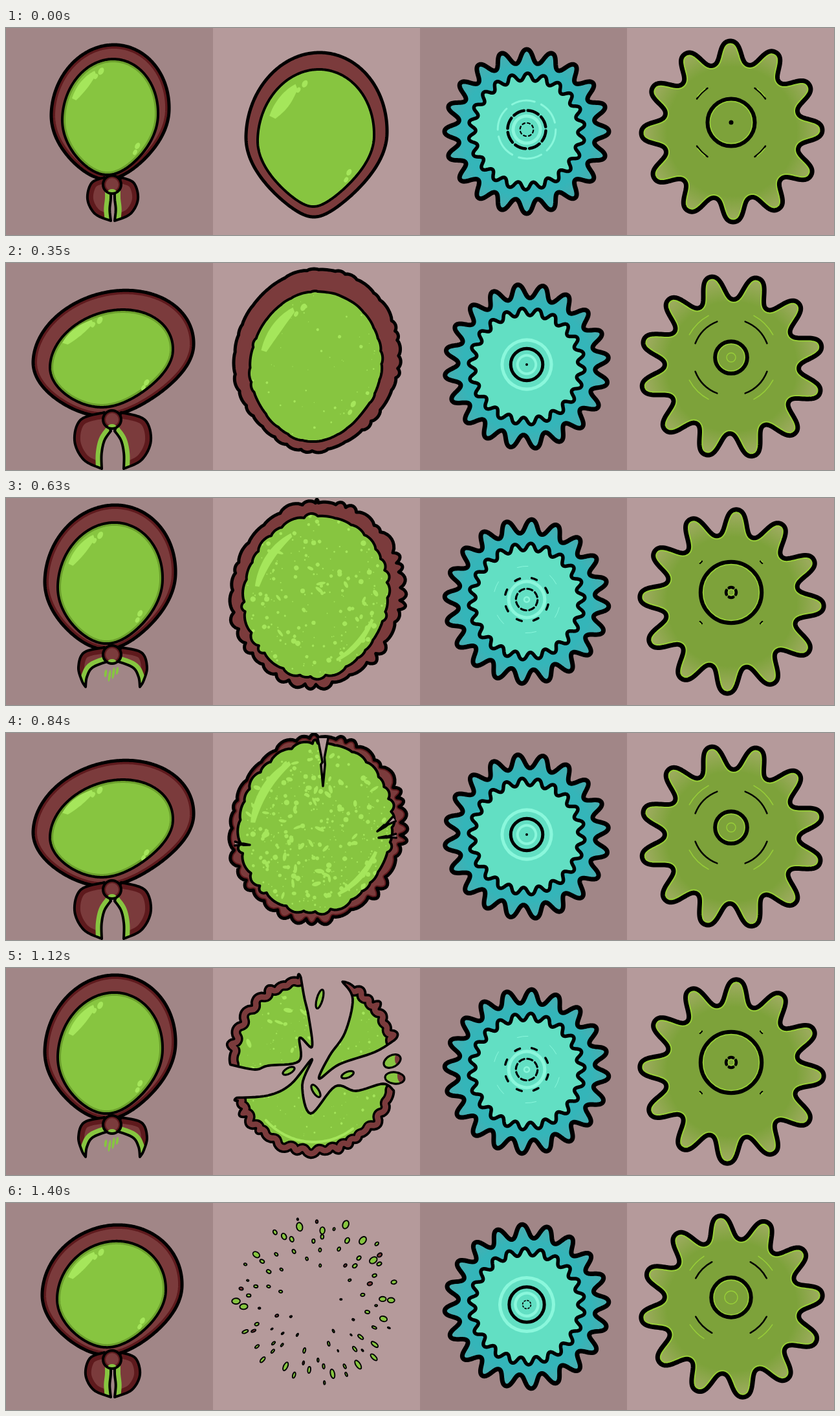
Recreate the animation shown at these times as an HTML page with a canvas. Size 1280x320 px, loop 1470 ms.

```html
<!DOCTYPE html>
<html lang="en">
<head>
<meta charset="utf-8">
<title>Slime shapes</title>
<style>
  html, body { margin: 0; width: 100%; height: 100%; overflow: hidden; background: #a18687; }
  canvas { display: block; width: 1280px; height: 320px; }
</style>
</head>
<body>
<canvas id="stage" width="1280" height="320"></canvas>
<script>
const ctx = document.getElementById('stage').getContext('2d');
const STEP = 70, COUNT = 21, CYCLE = 7, TAU = Math.PI * 2, DEG = TAU / 360;
const DARK = '#a18687', PALE = '#b59a9b', INK = '#000', SKIN = '#7b3b3c', SHADE = '#5e1a1d',
  SLIME = '#87c540', SHINE = '#a5e65b', MOSS = '#6b9f2c', LIME = '#98cf38', MINT = '#8af7dc';

// ---- geometry ----
const rng = seed => () => (seed = (seed * 16807) % 2147483647) / 2147483647;
const mix = (a, b, k) => a + (b - a) * k;

// Points of an egg, clockwise from the top; taper narrows the lower half.
function egg({ cx, top, bottom, rx, taper = 0, lean = 0, tilt = 0 }, from = 0, to = 360) {
  const cy = (top + bottom) / 2, ry = (bottom - top) / 2, pts = [];
  for (let d = from; d <= to; d++) {
    const s = Math.sin(d * DEG), c = Math.cos(d * DEG), low = Math.min(0, c);
    pts.push([cx + rx * s * (1 - taper * low * low) + lean * c, cy - ry * c - tilt * s]);
  }
  return pts;
}

function spline(pts, n = 8) {
  const out = [], get = i => pts[Math.max(0, Math.min(pts.length - 1, i))];
  for (let i = 0; i < pts.length - 1; i++) {
    const [a, b, c, d] = [get(i - 1), get(i), get(i + 1), get(i + 2)];
    for (let s = 0; s < n; s++) {
      const t = s / n;
      out.push([0, 1].map(q => b[q] + t / 2 * (c[q] - a[q] + t * (2 * a[q] - 5 * b[q] + 4 * c[q] - d[q]
        + t * (3 * (b[q] - c[q]) + d[q] - a[q])))));
    }
  }
  out.push(pts[pts.length - 1]);
  return out;
}

// Replaces a line with a row of uneven outward bumps.
function scallop(line, step, height, seed) {
  const rand = rng(seed), out = [];
  let a = line[0], need = step;
  line.forEach((p, i) => {
    const dx = p[0] - a[0], dy = p[1] - a[1], d = Math.hypot(dx, dy);
    if (!d || (d < need && i < line.length - 1)) return;
    const h = height * (.3 + rand());
    for (let s = 0; s < 8; s++) {
      const t = s / 8, b = h * Math.sin(Math.PI * t) ** .7;
      out.push([a[0] + dx * t + dy / d * b, a[1] + dy * t - dx / d * b]);
    }
    a = p;
    need = step * (.5 + rand());
  });
  out.push(a);
  return out;
}

function trace(pts, closed) {
  const path = new Path2D();
  pts.forEach(p => path.lineTo(p[0], p[1]));
  if (closed) path.closePath();
  return path;
}

// ---- painting ----
function fill(path, color) { ctx.fillStyle = color; ctx.fill(path); }
function line(path, color, width) { ctx.strokeStyle = color; ctx.lineWidth = width; ctx.stroke(path); }
function inside(path, draw) { ctx.save(); ctx.clip(path); draw(); ctx.restore(); }
function oval(x, y, rx, ry, turn = 0) {
  const p = new Path2D();
  p.ellipse(x, y, rx, ry, turn, 0, TAU);
  return p;
}
// Ring split into n equal dashes; part is the drawn share of each.
function ring(x, y, r, n, part, color, width, from = 0) {
  const p = new Path2D(), half = Math.PI / n * part;
  for (let i = 0; i < n; i++) {
    const mid = from + TAU / n * i;
    p.moveTo(x + r * Math.cos(mid - half), y + r * Math.sin(mid - half));
    p.arc(x, y, r, mid - half, mid + half);
  }
  line(p, color, width);
}

// Curved highlight at the upper left of an egg and four spots.
function gloss({ cx, top, bottom, rx }, from, to, thick, spots) {
  const cy = (top + bottom) / 2, ry = (bottom - top) / 2, edge = [[], []];
  for (let t = 0; t <= 1.001; t += .05) {
    const a = mix(from, to, t) * DEG, w = thick * Math.sin(Math.PI * (.12 + .8 * t)) ** .6;
    [.86, .86 - w].forEach((r, i) => edge[i].push([cx + rx * r * Math.sin(a), cy - ry * r * Math.cos(a)]));
  }
  fill(trace(edge[0].concat(edge[1].reverse()), true), SHINE);
  if (!spots) return;
  [[-.3, -.7, 3], [-.19, -.79, 4], [.57, .5, 3.6], [.52, .61, 3]].forEach(([u, v, r]) =>
    fill(oval(cx + rx * u, cy + ry * v, r, r * 1.5, .5), SHINE));
}

// ---- tied balloon ----
// Sack and belly as centre, top, bottom, half width; then tilt; flap width, spread and tip.
const POSES = [
  [0, 161, 26, 234, 91, 161, 48, 227, 74, 2, 39, 3, 298],
  [2, 161, 11, 234, 101, 161, 38, 225, 81, 4, 53, 42, 292],
  [5, 166, 43, 236, 124, 163, 73, 222, 95, 12, 59, 17, 318],
  [6, 164, 34, 235, 108, 163, 59, 223, 84, 5, 42, 3, 300]];

function poseAt(beat) {
  const i = Math.max(1, POSES.findIndex(p => p[0] >= beat)), a = POSES[i - 1], b = POSES[i];
  return a.map((v, j) => mix(v, b[j], (beat - a[0]) / (b[0] - a[0])));
}

function flap(side, wide, spread, tip) {
  const y = 231, h = tip - y, at = ([u, v]) => [165 + side * u, y + h * v];
  const rim = spline([[13, 0], [wide * .84, .13], [wide, .5], [wide * .68 + spread * .28, .84], [spread, 1]].map(at));
  const edge = spline([[spread, 1], [spread * .9 + 2, .74], [spread * .7 + 1, .5], [3, .33]].map(at));
  const path = trace(rim.concat(edge), true);
  fill(path, SKIN);
  inside(path, () => {
    line(trace(rim), SHADE, 18);
    line(trace(edge), SLIME, 18);
  });
  line(path, INK, 4);
}

function tied(beat) {
  const [, cx, top, bottom, rx, bx, btop, bbottom, brx, tilt, wide, spread, tip] = poseAt(beat);
  const core = { cx: bx, top: btop, bottom: bbottom, rx: brx, taper: .2, lean: 3, tilt };
  const sack = trace(egg({ cx, top, bottom, rx, taper: .25, lean: 4, tilt }), true), belly = trace(egg(core), true);
  fill(sack, SKIN);
  inside(sack, () => line(sack, SHADE, 12));
  fill(belly, SLIME);
  inside(belly, () => line(belly, MOSS, 10));
  gloss(core, -68, -22, .17, true);
  line(belly, INK, 4);
  line(sack, INK, 5);
  if (beat > 0 && beat < 4) {
    for (let i = 0; i < 4; i++) fill(oval(154 + i * 6, 257 + beat * 7 + 4 * Math.sin(i * 1.6), 2, 6 + 3 * (i % 3 > 0), .15), SLIME);
  }
  flap(-1, wide, spread, tip);
  flap(1, wide, spread, tip);
  const knot = oval(164, 242, 14, 14);
  fill(knot, SKIN);
  inside(knot, () => {
    line(knot, SHADE, 8);
    fill(oval(164, 254, 7, 5), SLIME);
  });
  line(knot, INK, 4);
}

// ---- bursting balloon ----
function specks(n, size, blobs) {
  const rand = rng(77);
  for (let i = 0; i < n + blobs; i++) {
    const a = rand() * TAU, d = Math.sqrt(rand()), r = size * (.5 + 2 * rand() ** 3);
    const long = i < n ? r : 3 + 5 * rand(), thin = i < n ? r : 2 + 1.5 * rand();
    fill(oval(480 + 110 * d * Math.cos(a), 150 + 123 * d * Math.sin(a), long, thin, rand() * 3), SHINE);
  }
}

function crack(x, y, dx, dy, wide) {
  const d = Math.hypot(dx, dy), nx = -dy / d * wide, ny = dx / d * wide;
  const at = (t, o) => [x + dx * t + nx * o, y + dy * t + ny * o];
  const path = trace([at(0, 1), at(.5, .1), at(.55, .4), at(1, 0), at(.55, -.4), at(.4, -.3), at(0, -1)]);
  fill(path, PALE);
  line(path, INK, 3.5);
}

function whole(age) {
  const rough = Math.max(0, Math.min(1, (age - 2) / 8)), taper = .4 * Math.exp(-age / 5);
  const hullEgg = { cx: 480, top: 7 + 31 * Math.exp(-age / 2.2), bottom: 292 - 4 * rough,
    rx: 131 - 22 * Math.exp(-age / 3), taper, lean: 3, tilt: 2 };
  const coreEgg = { cx: 479, top: 64 - 4 * age, bottom: 276, rx: 90 + 2.3 * age, taper, lean: 3, tilt: 2 };
  const shape = (e, height, seed) => trace(rough ? scallop(egg(e), 25, height * rough, seed) : egg(e), true);
  const hull = shape(hullEgg, 9, 31), core = shape(coreEgg, 5, 12);
  fill(hull, SKIN);
  if (age > 9) inside(hull, () => line(hull, SHADE, 9));
  fill(core, SLIME);
  inside(core, () => {
    if (age > 3) specks((age - 3) * 30, Math.min(1.7, .5 + age * .14), Math.max(0, age - 8) * 15);
    gloss(coreEgg, -68 - age * 1.5, -24, Math.max(.11, .2 - age * .01), age < 9);
    if (age > 8) gloss(coreEgg, 110, 160, .07, false);
  });
  line(core, INK, 4);
  line(hull, INK, 5);
  const open = Math.min(1.3, (age - 10) / 2);
  if (open > 0) {
    crack(490, 8, 0, 74 * open, 8);
    crack(603, 159, -27 * open, 3, 3);
    crack(600, 133, -26 * open, 19, 4);
    crack(354, 171, 23 * open, 2, 3);
  }
}

// Rim angles, drift direction and the torn edge back to the rim's start.
const PIECES = [
  { from: -90, to: -9, way: [-10, -7], edge: [[461, 45], [468, 76], [473, 122], [454, 108], [453, 144], [405, 151], [385, 157]] },
  { from: 20, to: 74, way: [11, -6], edge: [[570, 130], [515, 149], [484, 171], [500, 136], [524, 100], [536, 48]] },
  { from: 107, to: 248, way: [0, 9], edge: [[405, 197], [440, 180], [473, 141], [458, 181], [471, 225], [509, 183], [541, 190], [583, 179]] }];
// x, y, half length, turn
const CHIPS = [[485, 48, 15, 1.85], [437, 159, 10, -.5], [479, 190, 11, 1], [528, 165, 10, -.4], [597, 144, 14, -.5], [601, 170, 15, .1]];

function broken(age) {
  const back = (age - 16) * .55;
  PIECES.forEach(({ from, to, way, edge }, i) => {
    const rim = scallop(egg({ cx: 476, top: 13, bottom: 286, rx: 129 }, from, to), 20, 7, 41 + i);
    const torn = spline([rim[rim.length - 1], ...edge, rim[0]]);
    const path = trace(rim.concat(torn), true), band = trace(rim);
    ctx.save();
    ctx.translate(way[0] * back, way[1] * back);
    fill(path, SLIME);
    inside(path, () => {
      specks(150, .9, i ? 0 : 50);
      if (i > 1) line(trace(egg({ cx: 476, top: 40, bottom: 269, rx: 105 }, 145, 225)), SHINE, 4);
      line(band, INK, 28);
      line(band, SKIN, 21);
    });
    line(path, INK, 3.8);
    ctx.restore();
  });
  CHIPS.forEach(([x, y, len, turn]) => {
    const chip = oval(x, y, len, len > 13 && x > 590 ? 9 : 4.5, turn);
    fill(chip, SLIME);
    if (x > 590) inside(chip, () => fill(oval(x + 11, y - 3, 7, 11), SKIN));
    line(chip, INK, 3.2);
  });
}

function crumbs(age) {
  const left = 20 - age, rand = rng(23);
  for (let i = 0; i < 88; i++) {
    const a = i * 2.4 + rand() * .3, d = .3 + .7 * Math.sqrt(i / 88);
    const x = 480 + (126 - left * 2) * d * Math.cos(a), y = 149 + (130 - left * 2) * d * Math.sin(a);
    const len = (1.6 + 7 * d * d * rand()) * (1 + left * .5);
    const path = oval(x, y, len, len * (y > 190 ? .45 : .7), a);
    fill(path, rand() < .15 ? SKIN : SLIME);
    line(path, INK, 1.9);
  }
}

function burst(age) {
  if (age < 14) whole(age);
  else if (age < 17) broken(age);
  else crumbs(age);
}

// ---- gears ----
// Round-shouldered teeth: a cosine flattened at its ends.
function gear(x, y, n, tip, depth, turn, flat) {
  const pts = [];
  for (let i = 0; i < 720; i++) {
    const a = i / 720 * TAU, b = a + turn * DEG;
    const r = tip - depth + depth * Math.tanh(flat * Math.cos(n * a)) / Math.tanh(flat);
    pts.push([x + r * Math.sin(b), y - r * Math.cos(b)]);
  }
  return trace(pts, true);
}
function glow(x, y, base, rim) {
  const g = ctx.createRadialGradient(x, y, 100, x, y, 140);
  g.addColorStop(0, base);
  g.addColorStop(.85, rim);
  return g;
}
// Calls draw for every ring alive at this beat, one born each cycle.
function ripples(first, life, draw) {
  for (let age = first % CYCLE; age < life; age += CYCLE) draw(age);
}

function tealGear(beat) {
  const x = 805, y = 157, turn = (beat / CYCLE) ** 1.3 * 18;
  const outer = gear(x, 160, 20, 127, 10.5, turn, .8), inner = gear(x, 160, 22, 90, 5.5, turn * 20 / 22 + 1, .8);
  fill(outer, glow(x, 160, '#34b5b9', '#50aaad'));
  line(outer, INK, 7);
  fill(inner, '#62dfc3');
  line(inner, INK, 5.5);
  ripples(beat + 5, 15, age => {
    const r = 4 + 3.4 * age, fade = Math.max(0, age - 11);
    ring(x, y, r, fade ? 6 : 1, fade ? 1 - fade * .23 : 1, MINT, fade ? 4 - fade : Math.min(5, 2.5 + age / 2), .4);
  });
  ripples(beat + 2, 12, age => {
    const r = Math.max(2, 34 * (age / 11) ** .7);
    if (!age) fill(oval(x, y, r, r), INK);
    else if (age < 7) ring(x, y, r, 8, .35 + age * .07, INK, 1.2 + age * .5, .3);
    else if (age < 9) ring(x, y, r, 1, 1, INK, 5);
    else ring(x, y, r, 8, .75 - (age - 9) * .22, INK, 4.5 - (age - 9) * .5, .35);
  });
}

function leafGear(beat) {
  const x = 1121, y = 146, p = beat / CYCLE, swell = Math.sin(Math.PI * p), corner = Math.PI / 4;
  const body = gear(1122, 160, 12, 140 + 3 * swell, 17 + 3 * swell, 30 * p ** 1.6 - 1, 1.1);
  fill(body, glow(1122, 160, '#7da23a', '#9bab5c'));
  inside(body, () => line(body, LIME, 11));
  line(body, INK, 7);
  ripples(beat, 17, age => {
    const r = Math.max(3.5, 66 * Math.sin(age / 16 * Math.PI / 2) ** 1.3);
    if (!age) fill(oval(x, y, r, r), INK);
    else if (age < 10) {
      ring(x, y, r - 3.5, 1, 1, LIME, age < 3 ? 1.5 : 2.5);
      ring(x, y, r, age < 3 ? 4 : 1, age < 3 ? .55 : 1, INK, age < 3 ? 4.5 : 6);
    } else {
      const part = .9 * (1 - (age - 10) / 7) ** 1.6;
      ring(x, y, r, 4, part, INK, age < 12 ? 4 : 2.5, corner);
      ring(x, y, r + (age < 14 ? 14 : 1.5), 4, part * .7, LIME, 1.5, corner);
    }
  });
  if (beat > 3) ring(x, y, beat * 3 - 8, 1, 1, LIME, 1.4);
}

// ---- loop ----
ctx.lineJoin = 'round';
ctx.lineCap = 'round';
let shown = -1;

function paint(step) {
  const beat = step % CYCLE;
  for (let i = 0; i < 4; i++) {
    ctx.fillStyle = i % 2 ? PALE : DARK;
    ctx.fillRect(i * 320, 0, 320, 320);
  }
  tied(beat);
  burst(step);
  tealGear(beat);
  leafGear(beat);
}

function tick() {
  const step = Math.floor(performance.now() / STEP) % COUNT;
  if (step !== shown) paint(shown = step);
  requestAnimationFrame(tick);
}
tick();
</script>
</body>
</html>
```
